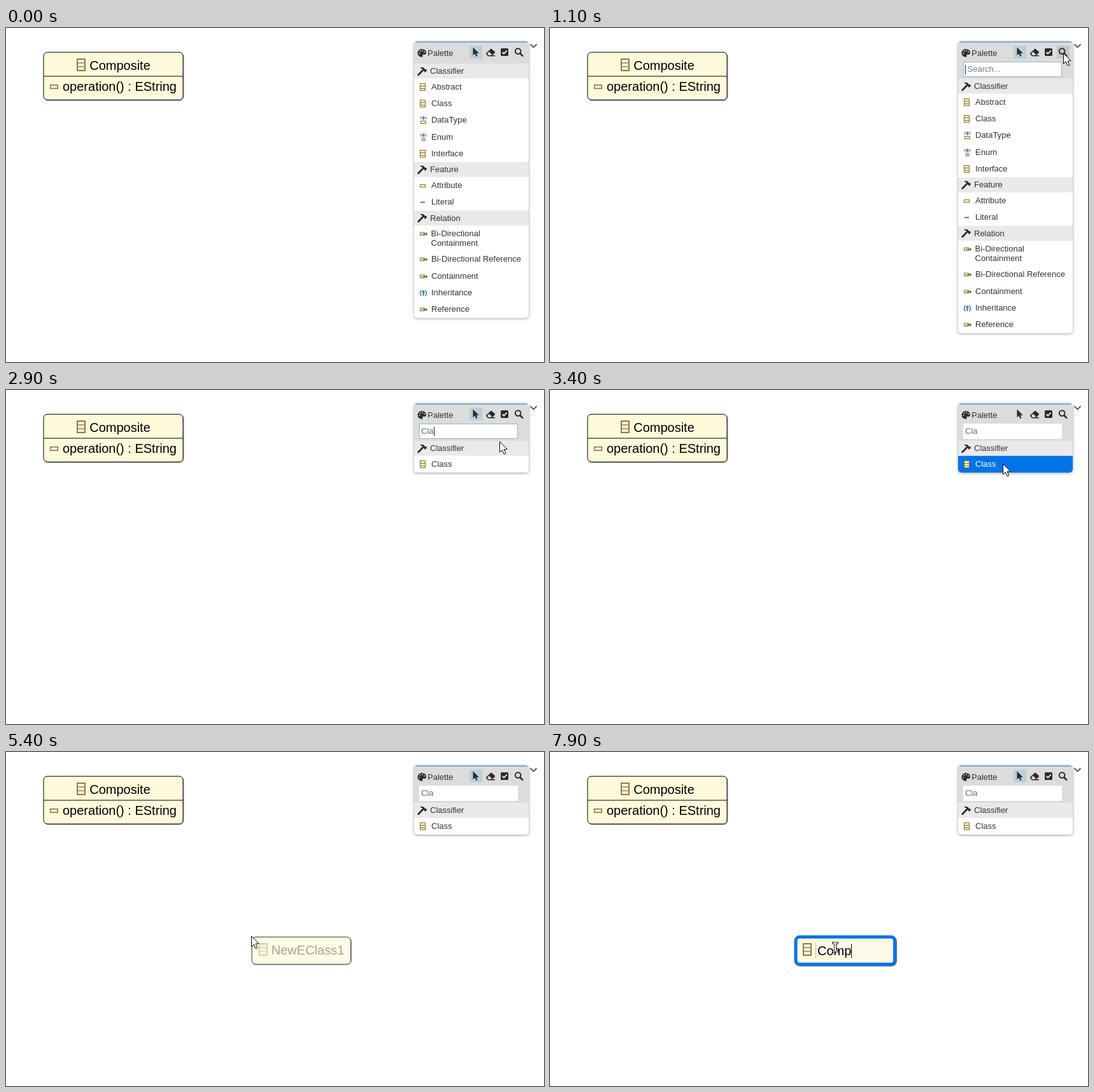
Write an HTML page that moves like this. It is 845 px wide and 526 px high and loops after 8 s.

```html
<!DOCTYPE html>
<html lang="en">
<head>
<meta charset="utf-8">
<title>Palette search</title>
<style>
  html, body { margin: 0; width: 100%; height: 100%; overflow: hidden; background: #fff; }
  svg { display: block; width: 845px; height: 526px; }
  text { font: 13px "Liberation Sans", Arial, sans-serif; fill: #333; white-space: pre; }
  .big { font-size: 20px; fill: #000; }
  .muted { fill: #666; }
  .hint { fill: #7a7a7a; }
  .panel { fill: #fff; filter: drop-shadow(0 1px 2px rgba(0, 0, 0, .4)); }
  .node { fill: #fdf9db; stroke: #000; }
  .shade { fill: none; stroke: #777; }
  .ink { fill: #2b2b2b; }
  .line { fill: none; stroke: #2b2b2b; }
  .gold { fill: #fbf3c4; stroke: #80712c; }
  .brown { fill: #f8f1d4; stroke: #8b6c2f; }
  .blue { fill: none; stroke: #2c4f7c; }
  .arrow { fill: #fff; stroke: #000; stroke-linejoin: round; }
</style>
</head>
<body>
<svg viewBox="0 0 845 526">
  <defs>
    <clipPath id="clip"><rect id="clipBox" x="641" y="21" width="180" height="436" rx="5"/></clipPath>
    <g id="bigClass">
      <rect class="brown" x="1" y="1" width="12" height="18" stroke-width="1.8"/>
      <path d="M1 7H13M1 13H13" stroke="#8f8a68" stroke-width="1.5"/>
    </g>
    <g id="class">
      <rect class="gold" x=".5" y="-5.5" width="8" height="11"/>
      <path class="gold" d="M.5-1.5H8.5M.5 2.5H8.5"/>
    </g>
    <g id="gem">
      <path class="blue" d="M2.5-5.5L.5-3.2L2.5-1M8.5-5.5L10.5-3.2L8.5-1M5.5-6L3.5-3.2L5.5-.5L7.5-3.2Z"/>
      <circle cx="5.5" cy="-3.2" r="1" fill="#2c4f7c"/>
    </g>
    <g id="type"><use href="#gem"/><rect class="gold" x="1.5" y="1.5" width="8" height="4"/></g>
    <g id="enum"><use href="#gem"/><path class="gold" d="M2 1.5H9M3 3.5H9M2 5.5H9"/></g>
    <rect id="attr" class="gold" x=".5" y="-1.5" width="8" height="4"/>
    <path id="lit" d="M1 .5H8" stroke="#80712c" stroke-width="2"/>
    <g id="ref">
      <rect class="gold" x=".5" y="-2" width="7" height="4.5"/>
      <path class="line" d="M4 .5H11.5M9-1.8L11.5.5L9 2.8"/>
    </g>
    <path id="inh" class="blue" style="stroke:#2b6484" stroke-width="1.2"
      d="M2.5-4.5Q-1.5.5 2.5 5.5M8.5-4.5Q12.5.5 8.5 5.5M5.5 5V-3M3-.5L5.5-3.2L8-.5M3.5 2H7.5"/>
    <g id="hammer">
      <path class="line" d="M1.2 5.8L8.5-1.8" stroke-width="2.8" stroke-linecap="round"/>
      <path class="ink" d="M3.5-5.2Q6.5-7.5 9.8-5.2L12-2.8L13-3.2L14.8-1.3L11.8 2L10-.0L10.2-1L7.8-3Q6-4.8 3.5-5.2Z"/>
    </g>
  </defs>

  <!-- first class node -->
  <rect class="shade" x="60" y="39.2" width="219" height="75" rx="6"/>
  <rect class="node" x="59" y="38.2" width="219" height="75" rx="6"/>
  <path d="M59 76H278" stroke="#000"/>
  <use href="#bigClass" x="111" y="48"/>
  <text class="big" x="131.2" y="66">Composite</text>
  <rect class="brown" x="69.7" y="89.7" width="11.6" height="5.6" stroke-width="1.4"/>
  <text class="big" x="89" y="99">operation() : EString</text>

  <!-- new class node -->
  <g id="fresh">
    <rect class="shade" id="freshShade" x="387" y="292.2" width="155.5" height="43" rx="6"/>
    <rect class="node" id="freshBox" x="386" y="291.2" width="155.5" height="43" rx="6"/>
    <g id="label">
      <use href="#bigClass" x="397" y="301"/>
      <text class="big" id="name" x="416.8" y="319">NewEClass1</text>
    </g>
    <g id="edit">
      <rect x="417" y="301" width="122" height="23" fill="#fcf9ea"/>
      <path d="M417.5 301V324" stroke="#777" stroke-dasharray="1 1"/>
      <rect id="mark" x="420" y="302" width="114.5" height="22" fill="#3584e4"/>
      <text class="big" id="typed" x="420" y="320"></text>
      <rect id="nameCaret" y="302" width="1" height="22"/>
    </g>
  </g>

  <!-- tool palette -->
  <path class="line" d="M823.5 25.5L828.5 30.5L833.5 25.5" style="stroke:#555" stroke-width="1.8"/>
  <rect class="panel" id="panel" x="641" y="21" width="180" height="436" rx="5"/>
  <g clip-path="url(#clip)">
    <rect id="head" x="641" y="21" width="180" height="35" fill="#dcdcdc"/>
    <rect x="641" y="21" width="180" height="2" fill="#82a9cb"/>
    <g id="rows"></g>
  </g>
  <rect id="pick" x="728" y="28" width="20" height="20" fill="#bccfda"/>
  <rect id="over" y="28" width="20" height="20" fill="#c6c6c6"/>
  <path class="ink" d="M653 33C657 33 660 35.8 660 39.2C660 42 657.5 42 655.5 41.8C653.5 41.8 655.2 44 654.3 45.2C653 46.5 646.5 45 646.5 39.5C646.5 36 649.5 33 653 33Z"/>
  <g fill="#dcdcdc"><circle cx="649.4" cy="40" r="1"/><circle cx="650.4" cy="36.6" r="1"/><circle cx="653.9" cy="35.6" r="1"/><circle cx="657" cy="37.7" r="1"/></g>
  <text x="662" y="44">Palette</text>
  <path class="ink" d="M733.5 30.5V43.3L736.4 40.5L738.4 45L740.6 44L738.7 39.7H742.8Z"/>
  <path class="ink" d="M762.5 32.8L768 37.6Q768.4 38.3 767.8 39L763.8 43H768V44.4H757.2L754.2 41.2Q753.6 40.3 754.3 39.5L761.2 32.9Q761.9 32.3 762.5 32.8Z"/>
  <path d="M758.6 37.6L763 41.5L761.4 43H757.9L755.8 40.5Z" fill="#dcdcdc"/>
  <rect class="ink" x="777" y="32" width="12" height="12" rx="1.6"/>
  <path d="M779.5 38L782 40.5L786.7 35.7" fill="none" stroke="#fff" stroke-width="1.7"/>
  <circle class="line" cx="804.2" cy="36.6" r="4.3" stroke-width="2"/>
  <path class="line" d="M807.5 40L811.3 43.8" stroke-width="2.5" stroke-linecap="round"/>
  <g id="search">
    <rect id="field" x="649.5" y="53.5" width="154" height="23" fill="#fff"/>
    <text id="query" y="69"></text>
    <rect id="caret" y="58" width="1" height="15" fill="#222"/>
  </g>

  <!-- pointer -->
  <g id="pointer">
    <path class="arrow" id="arrow" d="M.5.5V17L4.4 13.5L7.2 20L9.9 18.8L7.2 12.5L12.2 12.2Z"/>
    <path class="arrow" id="plus" d="M12.5 10.5H15.5V14H19.2V17H15.5V20H12.5V17H9.2V14H12.5Z"/>
    <path class="arrow" id="beam" d="M-1-7.5H2.5L3.5-6.5L4.5-7.5H8V-5H5V5.5H8V8H4.5L3.5 7L2.5 8H-1V5.5H2V-5H-1Z" stroke-width=".9"/>
  </g>
</svg>
<script>
const LOOP = 8000;
const HEAD_H = 23.7, ITEM_H = 26.3, TALL_H = 40;
const $ = id => document.getElementById(id);
const NS = "http://www.w3.org/2000/svg";

function add(parent, tag, attrs, text) {
  const el = document.createElementNS(NS, tag);
  for (const k in attrs) el.setAttribute(k, attrs[k]);
  if (text) el.textContent = text;
  return parent.appendChild(el);
}
const set = (id, attrs) => { for (const k in attrs) $(id).setAttribute(k, attrs[k]); };
const show = (id, on) => { $(id).style.display = on ? "" : "none"; };

const GROUPS = [
  ["Classifier", [["Abstract", "class"], ["Class", "class"], ["DataType", "type"], ["Enum", "enum"], ["Interface", "class"]]],
  ["Feature", [["Attribute", "attr"], ["Literal", "lit"]]],
  ["Relation", [["Bi-Directional\nContainment", "ref"], ["Bi-Directional Reference", "ref"], ["Containment", "ref"], ["Inheritance", "inh"], ["Reference", "ref"]]]
];

// Draws the filtered palette and returns its lower edge.
function drawRows(top, filter, active, hover) {
  const box = $("rows");
  box.textContent = "";
  let y = top;
  for (const [title, items] of GROUPS) {
    const hits = items.filter(([name]) => name.toLowerCase().includes(filter));
    if (!hits.length) continue;
    const mid = y + HEAD_H / 2;
    add(box, "rect", { x: 641, y, width: 180, height: HEAD_H, fill: "#e9e9e9" });
    add(box, "use", { href: "#hammer", x: 646.5, y: Math.round(mid) });
    add(box, "text", { x: 666, y: Math.round(mid + 4.4) }, title);
    y += HEAD_H;
    for (const [name, icon] of hits) {
      const lines = name.split("\n");
      const h = lines.length > 1 ? TALL_H : ITEM_H;
      const first = y + h / 2 - (lines.length - 1) * 7.5;
      const on = name === active;
      const fill = on ? "#0073e6" : name === hover ? "#e6e6e6" : "#fff";
      add(box, "rect", { x: 641, y, width: 180, height: h + .5, fill });
      add(box, "use", { href: "#" + icon, x: 650, y: Math.round(first) });
      lines.forEach((s, i) => add(box, "text", {
        x: lines.length > 1 ? 667.5 : 668,
        y: Math.floor(first + 4.4) + i * 15,
        style: on ? "fill:#fff" : ""
      }, s));
      y += h;
    }
  }
  return y;
}

// Keys are [time, ...values]; values are linear between keys.
function track(keys, t) {
  let i = 0;
  while (i < keys.length - 1 && keys[i + 1][0] <= t) i++;
  const a = keys[i], b = keys[i + 1] || a;
  const k = b === a ? 0 : Math.max(0, (t - a[0]) / (b[0] - a[0]));
  return a.slice(1).map((v, j) => v + (b[j + 1] - v) * k);
}
const PATH = [
  [400, 690, 8], [600, 752, 32], [700, 780, 44], [800, 798, 43], [900, 806, 39.5], [2700, 806, 39.5],
  [2800, 791, 60], [2900, 775, 81], [3000, 752, 98], [3100, 728, 110], [3200, 711, 116], [3800, 711, 116],
  [3900, 581, 131], [4000, 581, 131], [4100, 505, 195], [4200, 425, 250], [4300, 358, 286], [4400, 300, 296],
  [4500, 262, 293], [4700, 360, 290], [4800, 385, 289.5], [5800, 385, 289.5], [5900, 415, 297], [6000, 445, 303.5],
  [6300, 445, 303.5], [6400, 444.5, 307]
];
const FADE = [[5100, .05], [5300, .45], [5400, .7], [5500, .9], [5600, .9], [5700, 1]];

// Latest entry whose time has come.
const last = (steps, t) => steps.reduce((v, [at, s]) => t >= at ? s : v, "");
const QUERY = [[2000, "C"], [2100, "Cl"], [2500, "Cla"]];
const NAME = [[6600, "NewEClass1"], [7200, "C"], [7400, "Co"], [7700, "Com"], [7900, "Comp"]];

function drawPalette(t, x, y) {
  const open = t >= 1100, focus = open && t < 3400;
  const armed = t >= 3400 && t < 5100;
  const query = last(QUERY, t);
  const top = open ? 80 : 56;
  const onClass = t >= 3000 && t < 3900 && y > 104;
  const end = drawRows(top, query.toLowerCase(), armed && "Class", onClass && "Class");
  set("panel", { height: end - 21 });
  set("clipBox", { height: end - 21 });
  set("head", { height: top - 21 });

  const tool = t >= 400 && y >= 28 && y < 48 ? [750, 773, 796].find(l => x >= l && x < l + 20) : 0;
  show("over", tool);
  if (tool) set("over", { x: tool });
  show("pick", !armed);

  show("search", open);
  if (!open) return;
  set("field", { stroke: focus ? "#8db5d6" : "#fff" });
  $("query").textContent = query || "Search...";
  set("query", { x: query ? 652 : 655.5, class: query ? "muted" : "hint" });
  const since = t >= 2500 ? 2500 : t >= 2100 ? 2100 : t >= 2000 ? 2000 : 1100;
  show("caret", focus && (t - since) % 1000 < 500);
  set("caret", { x: query ? Math.round(652 + $("query").getComputedTextLength()) : 652 });
}

function drawNode(t) {
  show("fresh", t >= 5100);
  const [a] = track(FADE, t);
  set("freshBox", {
    opacity: a,
    style: t >= 6200 ? "stroke:#0073e6;stroke-width:5" : t >= 5900 ? "stroke:#0073e6;stroke-width:3" : ""
  });
  set("freshShade", { opacity: a, "stroke-width": t >= 6200 ? 5 : t >= 5900 ? 3 : 1 });
  set("label", { opacity: a ** 3 });

  const editing = t >= 6600, all = t < 7200;
  show("edit", editing);
  show("name", !editing);
  if (!editing) return;
  $("typed").textContent = last(NAME, t);
  $("typed").style.fill = all ? "#fff" : "#000";
  show("mark", all);
  show("nameCaret", !all);
  set("nameCaret", { x: Math.round(420 + $("typed").getComputedTextLength()) });
}

function draw(t) {
  const [x, y] = track(PATH, t);
  drawPalette(t, x, y);
  drawNode(t);
  show("pointer", t >= 400);
  set("pointer", { transform: `translate(${x} ${y})` });
  show("arrow", t < 6400);
  show("plus", t >= 3900 && t < 5100);
  show("beam", t >= 6400);
}

// The screen refreshes ten times a second.
let shown = -1;
function tick() {
  const t = Math.floor(performance.now() % LOOP / 100) * 100;
  if (t !== shown) draw(shown = t);
  requestAnimationFrame(tick);
}
tick();
</script>
</body>
</html>
```
